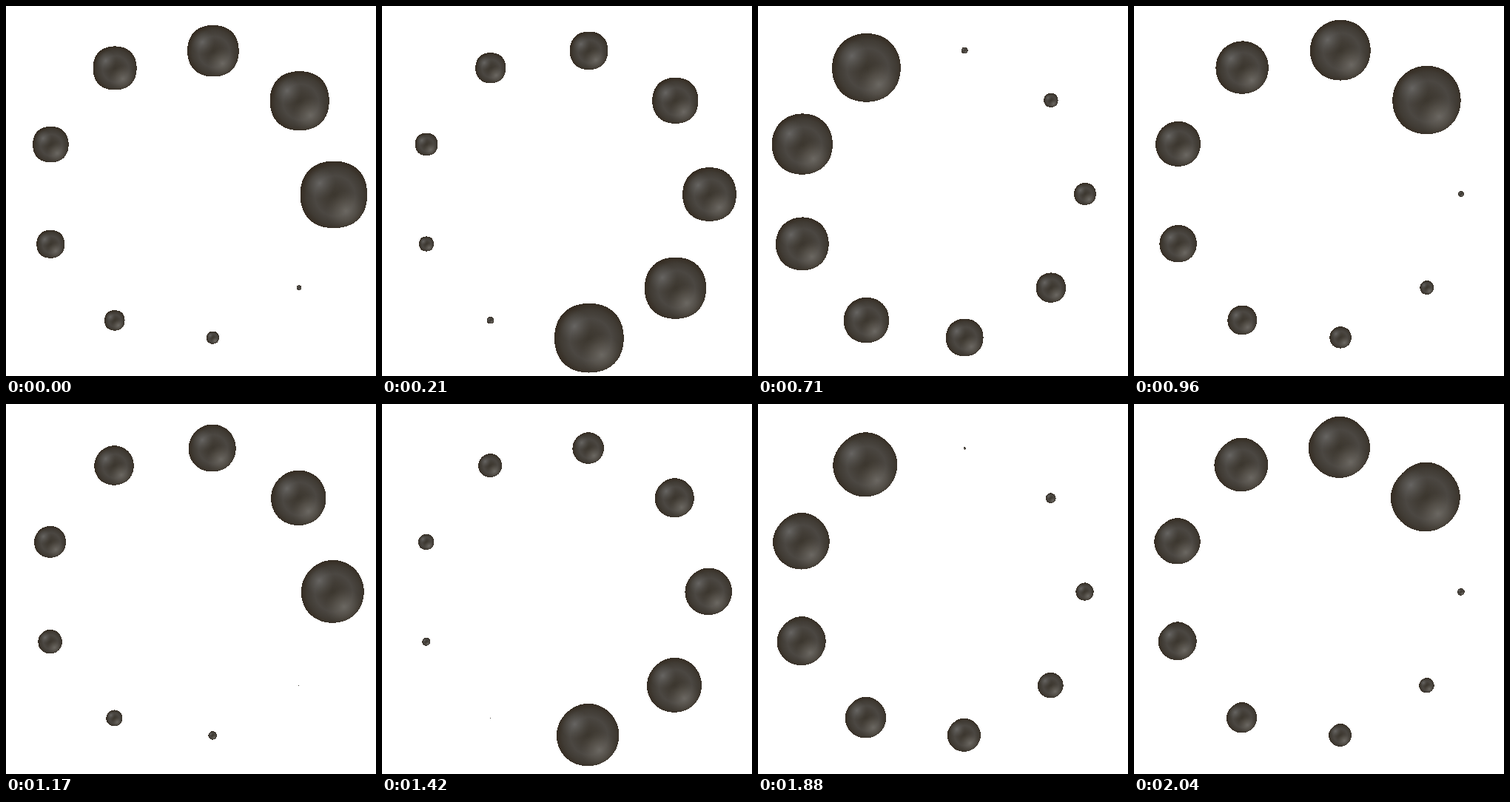
Write an HTML page that moves like this. It is 500x500 px and loops after 2080 ms.

```html
<!DOCTYPE html>
<html lang="en">
<head>
<meta charset="utf-8">
<title>Shrinking beads</title>
<style>
  html, body { margin: 0; width: 100%; height: 100%; overflow: hidden; background: #fff; }
  svg { display: block; width: 100vw; height: 100vh; }
</style>
</head>
<body>
<svg id="stage" viewBox="0 0 500 500">
  <defs>
    <radialGradient id="body" cx=".52" cy=".52" r=".52">
      <stop offset="0" stop-color="#3b362e"/>
      <stop offset=".3" stop-color="#423d36"/>
      <stop offset=".58" stop-color="#4b4742"/>
      <stop offset=".82" stop-color="#403b34"/>
      <stop offset="1" stop-color="#352c22"/>
    </radialGradient>
    <radialGradient id="upperGlow" cx=".29" cy=".33" r=".24">
      <stop offset="0" stop-color="#858585" stop-opacity=".48"/>
      <stop offset=".5" stop-color="#747473" stop-opacity=".25"/>
      <stop offset="1" stop-color="#60605e" stop-opacity="0"/>
    </radialGradient>
    <radialGradient id="lowerGlow" cx=".68" cy=".74" r=".3">
      <stop offset="0" stop-color="#8a8781" stop-opacity=".52"/>
      <stop offset=".5" stop-color="#79756e" stop-opacity=".3"/>
      <stop offset="1" stop-color="#625d55" stop-opacity="0"/>
    </radialGradient>
    <g id="bead" shape-rendering="crispEdges">
      <path fill="url(#body)"/>
      <path fill="url(#upperGlow)"/>
      <path fill="url(#lowerGlow)"/>
    </g>
  </defs>
</svg>
<script>
const LOOP = 2080, FRAMES = 50, COUNT = 9;
const CENTER = { x: 245, y: 254 }, RING = 197, MAX_SIZE = 94.7;
const START_PHASE = 0.957, PHASE_STEP = 17 / (COUNT * FRAMES);

const stage = document.getElementById("stage");
const layers = document.querySelectorAll("#bead path");
const beads = Array.from({ length: COUNT }, (_, i) => {
  const node = document.createElementNS(stage.namespaceURI, "use");
  const angle = i * 2 * Math.PI / COUNT;
  node.setAttribute("href", "#bead");
  stage.append(node);
  return { node, x: CENTER.x + RING * Math.cos(angle), y: CENTER.y - RING * Math.sin(angle) };
});

// One-sided flattening around the given direction.
const dent = (a, direction) => Math.max(0, Math.cos(a - direction)) ** 6;

// Unit outline: a rounded square that relaxes into a disc with flattened shoulders.
function outline(progress) {
  const square = 0.04 * (1 - progress);
  const shift = 0.02 - 0.066 * progress;
  const points = [];
  for (let i = 0; i < 72; i++) {
    const a = i * Math.PI / 36;
    const shoulders = 0.055 * dent(a, 1.25 * Math.PI) + 0.025 * dent(a, 1.75 * Math.PI);
    const r = 1 + square * (1 - Math.cos(4 * a)) / 2 - progress * shoulders;
    points.push(`${(shift + r * Math.cos(a)).toFixed(4)},${(shift + r * Math.sin(a)).toFixed(4)}`);
  }
  return `M${points.join("L")}Z`;
}

// 24 steps per second, with start times rounded to 10 ms.
function stepAt(ms) {
  const tick = Math.floor(ms % LOOP / 10) * 10;
  return Math.min(FRAMES - 1, Math.floor((tick + 4.9) * 0.024));
}

function render(step) {
  const d = outline(step / (FRAMES - 1));
  layers.forEach(path => path.setAttribute("d", d));
  beads.forEach(({ node, x, y }, i) => {
    const phase = START_PHASE - step * PHASE_STEP - i / COUNT + 3;
    const radius = (phase % 1) * MAX_SIZE / 2;
    node.setAttribute("transform", `translate(${x} ${y}) scale(${radius})`);
  });
}

let start, shown = -1;
function tick(now) {
  start ??= now;
  const step = stepAt(now - start);
  if (step !== shown) render(shown = step);
  requestAnimationFrame(tick);
}
render(0);
requestAnimationFrame(tick);
</script>
</body>
</html>
```
